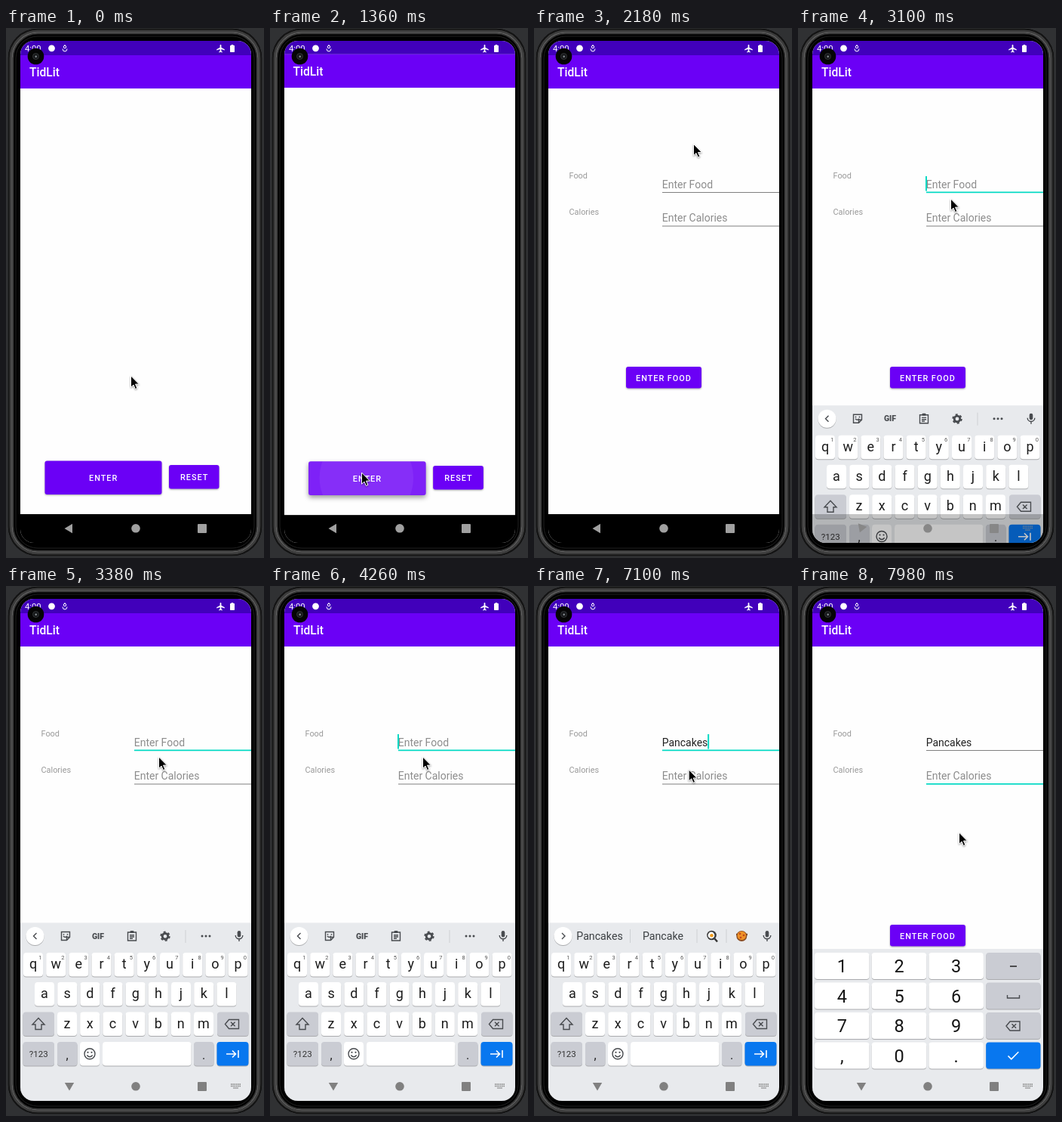
Animation, 342 px wide and 701 px high, one loop 8 s. Source, as an HTML page:

```html
<!DOCTYPE html>
<html lang="en">
<head>
<meta charset="utf-8">
<title>Food log</title>
<style>
html, body { margin: 0; height: 100%; overflow: hidden; background: #303133; }
svg { display: block; font-family: Roboto, sans-serif; }
text { white-space: pre; }
.caps { font-weight: 500; letter-spacing: .97px; }
.mid { text-anchor: middle; }
.key { filter: drop-shadow(0 1px .3px #0004); }
.btn { filter: drop-shadow(0 1px 1px #0005); }
.pressed { filter: drop-shadow(0 3px 3px #0006); }
</style>
</head>
<body>
<svg id="stage" width="342" height="701" viewBox="0 0 342 701"></svg>
<script>
const PURPLE = '#6b00f6', TEAL = '#00d9c4', BOARD = '#e8eaed', GREY = '#caccd3', BLUE = '#0877ef', INK = '#484b4f';

const rect = (x, y, w, h, r, fill, more = '') =>
  `<rect x="${x}" y="${y}" width="${w}" height="${h}" rx="${r}" fill="${fill}" ${more}/>`;
const circle = (x, y, r, fill, more = '') => `<circle cx="${x}" cy="${y}" r="${r}" fill="${fill}" ${more}/>`;
const text = (x, y, size, fill, str, more = '') =>
  `<text x="${x}" y="${y}" font-size="${size}" fill="${fill}" ${more}>${str}</text>`;
const line = (d, color = INK, w = 1.4, more = '') =>
  `<path d="${d}" fill="none" stroke="${color}" stroke-width="${w}" ${more}/>`;
const shape = (d, fill) => `<path d="${d}" fill="${fill}"/>`;
const group = (id, body, more = '') => `<g id="${id}" ${more}>${body}</g>`;
const mid = 'class="mid"';

// Phone body: nested outlines from the rim inwards
const ring = (inset, color, w) => rect(inset, inset - 2, 342 - 2 * inset, 703 - 2 * inset, 42 - inset, 'none',
  `stroke="${color}" stroke-width="${w}"`);
const phone = rect(3, 1, 336, 697, 38, '#000') + ring(3.5, '#161616', 1.5) + ring(6, '#3c3c3c', 3) +
  ring(8, '#626262', 1.5) + ring(9.5, '#383838', 1.5) + ring(13, '#202020', 1);

// App screens
const bars = rect(-20, -20, 382, 741, 0, '#fefefe') + rect(-20, -20, 382, 56, 0, '#4100bb') +
  rect(-20, 36, 382, 44, 0, PURPLE) + text(31, 64, 15.6, '#fff', 'TidLit', 'font-weight="500"') +
  rect(-20, 643, 382, 100, 0, '#000');
const button = (x, y, w, h, tx, ty, label, inner = '') =>
  rect(x, y, w, h, 3, PURPLE) + inner + text(tx, ty, 10.9, '#fff', label, 'class="caps"');

const home = bars +
  group('enter', button(51.5, 572.5, 155, 44.5, 110, 599, 'ENTER',
    group('press', rect(51.5, 572.5, 155, 44.5, 3, '#fff', 'opacity=".13"') +
      circle(128, 594, 62, '#fff', 'id="ripple" opacity=".06" clip-path="url(#btnClip)"'))), 'class="btn"') +
  `<g class="btn">${button(216, 578, 66.5, 31.5, 231, 598, 'RESET')}</g>`;

const form = bars +
  text(46.5, 199.3, 10.9, '#999', 'Food') + text(46.5, 247, 10.9, '#999', 'Calories') +
  text(169.7, 211.6, 14, '#8c8c8c', 'Enter Food', 'id="hint"') +
  text(169.7, 211.6, 14, '#222', '', 'id="food"') +
  text(169.7, 256, 14, '#8c8c8c', 'Enter Calories') +
  rect(170, 217, 155, 1, 0, '#808080', 'id="line1"') + rect(170, 261.5, 155, 1, 0, '#808080', 'id="line2"') +
  rect(169, 196, 2, 19.5, 0, TEAL, 'id="caret"') +
  `<g class="btn">${button(122, 448, 100, 28.5, 135, 466.6, 'ENTER FOOD')}</g>`;

// Keyboards
const key = (x, y, w, h, fill = '#fff') => rect(x, y, w, h, 4, fill, 'class="key"');
const letters = (row, x0, y) => [...row].map((c, i) => {
  const x = x0 + i * 30.17;
  return key(x - 13, y, 26, 31.5) + text(x, y + 21, 18, '#1c1c1c', c, 'class="mid letter"') +
    (row.length > 9 ? text(x + 9.3, y + 8.5, 7.5, '#555', (i + 1) % 10, mid) : '');
}).join('');
const erase = (x, y) => line(`M${x - 9} ${y}l5-6h13v12h-13zm7.5-2.8l5.6 5.6m0-5.6l-5.6 5.6`);
const mic = rect(306.7, 456, 4.6, 8.5, 2.3, INK) + line('M304.2 462a4.8 4.8 0 0 0 9.6 0M309 467v3');

const tools = line('M40.5 459l-4 4 4 4') +
  line('M73.5 457.5h11v7l-4 4h-7zM84.5 464.5h-4v4M76 463q2.5 3 5 0') +
  circle(76.5, 460.8, .9, INK) + circle(81.5, 460.8, .9, INK) +
  text(122, 466.6, 10.5, INK, 'GIF', 'class="mid" font-weight="900"') +
  line('M161.5 458h11v11h-11zM164 461.7h6M164 464h6M164 466.3h4') + rect(164.5, 456, 5, 3, 1, INK) +
  circle(211, 463.3, 3.8, 'none', `stroke="${INK}" stroke-width="2.8"`) +
  circle(211, 463.3, 5.8, 'none', `stroke="${INK}" stroke-width="1.8" stroke-dasharray="3 3.07"`) +
  rect(237.5, 455, 1, 17, 0, '#cdd0d4') + [260, 265, 270].map(x => circle(x, 463, 1.5, INK)).join('');

const emoji = line('M239.5 466.5l3.5 4', '#333', 2.4) + circle(235.5, 462, 6.3, '#3a3a3a') +
  circle(235, 462, 4.4, '#fff') + circle(235.5, 462.3, 2.3, '#f39b1b') +
  line('M268 461h15', '#7a4a25', 2.5) + circle(275.3, 463, 7, '#8b4c22') + circle(275.3, 462.4, 5.7, '#ee9227') +
  [[273, 460], [278, 462], [274, 465]].map(([x, y]) => circle(x, y, 1.3, '#c1441e')).join('');
const sugg = line('M37 459l4 4-4 4') + [127, 215.5].map(x => rect(x, 454, 1, 18, 0, '#cdd0d4')).join('') +
  [87, 171, 248].map((x, i) => text(x, 468.3, 14.2, '#3c4043', '', `class="mid" id="word${i}"`)).join('') +
  group('emoji', emoji + rect(254.5, 454, 1, 18, 0, '#cdd0d4'));

const qwerty = rect(19, 445.5, 306, 300, 0, BOARD) + circle(38.5, 463, 12, '#fff', 'class="key"') +
  group('tools', tools) + group('sugg', sugg) + mic +
  letters('qwertyuiop', 36, 485) + letters('asdfghjkl', 51, 524) + letters('zxcvbnm', 81, 563.5) +
  key(22.5, 563.5, 41.5, 31.5, GREY) + line('M43 571.5l8 8.5h-4v6.5h-8v-6.5h-4z') +
  key(280, 563.5, 41.5, 31.5, GREY) + erase(299.5, 579.5) +
  key(22.5, 603, 41.5, 31.5, GREY) + text(43.2, 623.2, 11.5, '#333', '?123', mid) +
  key(68, 603, 26.5, 31.5, GREY) + text(81.2, 625.5, 16, '#222', ',', mid) +
  key(98, 603, 26, 31.5) + circle(111, 618.8, 7, 'none', `stroke="${INK}" stroke-width="1.4"`) +
  circle(108.5, 616.8, 1.1, INK) + circle(113.5, 616.8, 1.1, INK) + line('M107.3 620.5q3.7 4.5 7.4 0') +
  key(128, 603, 117.5, 31.5) +
  key(249, 603, 26.5, 31.5, GREY) + text(262.2, 625.5, 16, '#222', '.', mid) +
  key(279.5, 603, 42, 31.5, BLUE) + line('M292 619h12M300 614.5l4.5 4.5-4.5 4.5M308 614v10', '#fff', 1.6);

const numpad = rect(19, 480, 306, 220, 0, BOARD) +
  ['123', '456', '789', ',0.'].map((row, j) => [...row].map((c, i) =>
    key(22 + i * 75.7, 485 + j * 39.5, 72.5, 35) +
    text(58.3 + i * 75.7, 511 + j * 39.5, 23.5, '#151515', c, mid)).join('') +
    key(249.2, 485 + j * 39.5, 72.3, 35, j < 3 ? GREY : BLUE)).join('') +
  line('M281 503h9', '#222', 1.7) + line('M277.5 541v4h16v-4') + erase(285, 582) +
  line('M278.5 621.5l4.3 4.3 9.5-9.5', '#fff', 1.6);

// System chrome
const nav = shape('M77.5 662l10.5-6.2v12.4z', 'currentColor');
const status = text(25, 31, 11.2, '#fff', '4:00') + circle(60.5, 26.8, 4.4, '#fff') +
  circle(78, 25, 1.7, 'none', 'stroke="#fff"') + line('M75 27.5q.2 3.5 3 3.5t3-3.5M78 23v-1', '#fff', 1) +
  shape('M284.5 22q.9 0 .9 1.2v2.5l4.4 2.6v1.2l-4.4-1.4v2.4l1.3 1v.9l-2.2-.6-2.2.6v-.9l1.3-1v-2.4l-4.4 1.4v-1.2l4.4-2.6v-2.5q0-1.2.9-1.2z', '#fff') +
  rect(297, 23, 6, 9, .8, '#fff') + rect(298.7, 22, 2.6, 2, 0, '#fff') +
  circle(39.5, 37.5, 10.8, '#050505') + circle(39.5, 37.5, 4, '#17191b', 'stroke="#303335"') +
  circle(39.7, 37.7, 1.2, '#8b9296');
const arrow = '<path d="M0 0v15.2l3.5-3.2 2.4 5.5 2.5-1.1-2.4-5.3h4.9z" stroke="#fff" stroke-width="1" ' +
  'style="filter:drop-shadow(0 1px 1px #0006)"/>';

document.getElementById('stage').innerHTML =
  `<defs><clipPath id="screen">${rect(19, 17, 306, 664, 18, '#000')}</clipPath>
  <clipPath id="btnClip">${rect(51.5, 572.5, 155, 44.5, 3, '#000')}</clipPath></defs>` + phone +
  `<g clip-path="url(#screen)">` + group('home', home) + group('form', form) +
  group('qwerty', qwerty) + group('numpad', numpad) + rect(19, 643, 306, 38, 0, '#000', 'id="dim"') +
  group('nav', group('back', nav) + circle(172, 661.8, 5.8, 'currentColor') +
    rect(254, 656, 12, 12, 1, 'currentColor') +
    group('switch', line('M298 659h13M298 661.5h13', 'currentColor', 1.3, 'stroke-dasharray="1.5 .8"') +
      line('M301 664h7', 'currentColor', 1.2))) + status + '</g>' + group('arrow', arrow);

const el = {};
document.querySelectorAll('[id]').forEach(e => el[e.id] = e);
const keyLetters = [...document.querySelectorAll('.letter')].map(e => [e, e.textContent]);

const clamp = v => Math.max(0, Math.min(1, v));
const span = (t, a, b) => clamp((t - a) / (b - a));
const latest = (list, t) => list.findLast(s => s[0] <= t);
const show = (e, on) => e.style.display = on ? '' : 'none';
const set = (e, attrs) => { for (const k in attrs) e.setAttribute(k, attrs[k]); };

const path = [[0, 165.5, 460], [220, 165.5, 460], [660, 121.5, 588], [1620, 121.5, 588], [2180, 211.5, 153.5],
  [2410, 189.5, 182.5], [2440, 189.5, 182.5], [2640, 193, 193], [2780, 193, 193], [3060, 202.5, 226],
  [6950, 202.5, 226], [7170, 206, 248], [7360, 206, 248], [7740, 212, 322], [7780, 212, 322], [7960, 213.5, 326]];
const typed = [[0, ''], [3850, 'P'], [4140, ''], [4620, 'P'], [4860, 'Pa'], [5260, 'Pan'], [5980, 'Panc'],
  [6100, 'Panca'], [6220, 'Pancak'], [6340, 'Pancake'], [6510, 'Pancakes']];
const offers = [[0], [3850, 'P', 'I', 'Pizza'], [4260], [4680, 'P', 'Pa', 'Past'], [4920, 'Pa', 'Pan', 'Past'],
  [5320, 'Pan', 'Plan', ''], [6040, 'Panc', 'Pancake', ''], [6400, 'Pancake', 'Pancakes', ''],
  [6690, 'Pancakes', 'Pancake', '']];
const caretOn = [[0, 0], [2880, 1], [3380, 0], [3790, 1], [5030, 0], [5260, 1], [5920, 0], [5980, 1],
  [7240, 1], [7800, 0]];

function pointer(t) {
  const i = path.findLastIndex(p => p[0] <= t), a = path[i], b = path[i + 1] || a;
  const u = a === b ? 0 : span(t, a[0], b[0]), e = u * u * (3 - 2 * u);
  return `translate(${a[1] + (b[1] - a[1]) * e} ${a[2] + (b[2] - a[2]) * e})`;
}

function focusLine(e, y, on) {
  set(e, { y: on ? y - .5 : y, height: on ? 1.7 : 1, fill: on ? TEAL : '#808080' });
}

function draw(t) {
  // Opening screen: press, then zoom out of the way
  const s = t < 1360 ? 1 : 1.0035 + .044 * span(t, 1360, 1480), press = span(t, 1020, 1200);
  show(el.home, t < 1660);
  set(el.home, { transform: `translate(172 349) scale(${s}) translate(-172 -349)` });
  set(el.enter, { class: press ? 'pressed' : 'btn' });
  set(el.press, { opacity: press });
  set(el.ripple, { r: 20 + 42 * press });

  // Form
  const food = t >= 2880 && t < 7240, cal = t >= 7240, word = latest(typed, t)[1];
  show(el.form, t >= 1660);
  show(el.hint, !word);
  el.food.textContent = word;
  set(el.food, { 'text-decoration': food && t < 6990 && (t < 6510 || t >= 6690) ? 'underline' : 'none' });
  focusLine(el.line1, 217, food);
  focusLine(el.line2, 261.5, cal);
  show(el.caret, latest(caretOn, t)[1]);
  set(el.caret, { x: word && !cal ? 169.5 + el.food.getComputedTextLength() : 169, y: cal ? 241 : 196 });

  // Keyboards
  const p = 1 - (1 - span(t, 2923, 3380)) ** 3, words = latest(offers, t);
  show(el.qwerty, p > 0 && t < 7320);
  show(el.numpad, t >= 7320);
  set(el.qwerty, { transform: `translate(0 ${236 * (1 - p)})` });
  show(el.tools, words.length < 2);
  show(el.sugg, words.length > 1);
  show(el.emoji, words[3] === '');
  for (let i = 0; i < 3; i++) el['word' + i].textContent = words[i + 1] || '';
  const upper = t >= 3790 && t < 3850;
  for (const [e, c] of keyLetters) e.textContent = upper ? c.toUpperCase() : c;

  // Navigation row
  const tone = Math.round(160 - 32 * p);
  set(el.dim, { opacity: p ? 1 - p : 0 });
  el.nav.style.color = `rgb(${tone},${tone},${tone})`;
  set(el.back, { transform: `rotate(${-90 * p} 83.5 661.5)` });
  set(el.switch, { opacity: p });
  set(el.arrow, { transform: pointer(t) });
}

const start = performance.now();
function tick(now) {
  draw(Math.max(0, now - start) % 8000);
  requestAnimationFrame(tick);
}
draw(0);
requestAnimationFrame(tick);
</script>
</body>
</html>
```
